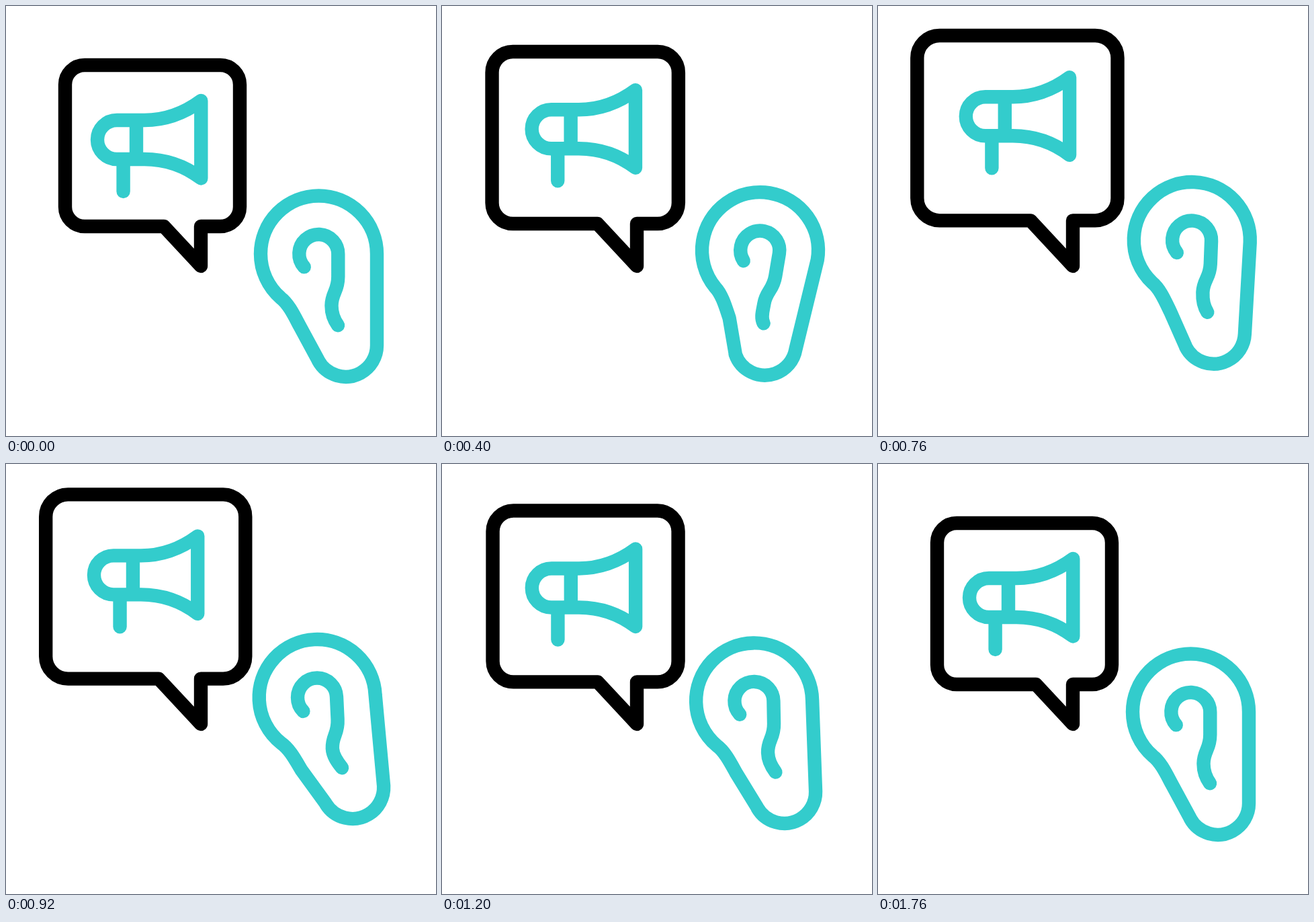
Animation, 640 px wide and 640 px high, one loop 1880 ms. Source, as an HTML page with a canvas:

```html
<!DOCTYPE html>
<html lang="en">
<head>
<meta charset="utf-8">
<title>Listening ear</title>
<style>
html, body { margin: 0; width: 100%; height: 100%; overflow: hidden; background: #fff; }
canvas { display: block; width: 100vw; height: 100vh; }
</style>
</head>
<body>
<canvas id="stage" width="640" height="640"></canvas>
<script>
const ctx = document.getElementById('stage').getContext('2d');
const LOOP = 1880, STEP = 40;
const BLACK = '#000', TEAL = '#33cccc';
const rad = deg => deg * Math.PI / 180;

// Each track is a list of [ms, value] keys joined by a sine ease.
const GROW = [[100, 0], [737, 1], [850, 1], [1485, 0]];
const LIFT = [[148, 0], [860, -21.5], [990, -21.5], [1618, 0]];
const TILT = [[60, 0], [455, 10], [1010, -3.6], [1310, 0]];
const SWING = [[60, 0], [530, -12], [1005, 7.5], [1490, -7], [1760, 0]];

function at(keys, t) {
  if (t <= keys[0][0]) return keys[0][1];
  for (let i = 1; i < keys.length; i++) {
    const [t0, v0] = keys[i - 1], [t1, v1] = keys[i];
    if (t < t1) {
      const u = (t - t0) / (t1 - t0);
      return v0 + (v1 - v0) * (1 - Math.cos(Math.PI * u)) / 2;
    }
  }
  return keys[keys.length - 1][1];
}

function stroke(color, trace) {
  ctx.beginPath();
  trace();
  ctx.strokeStyle = color;
  ctx.stroke();
}

// Grows from the tip of its tail while the line keeps its weight.
function drawBubble(grow) {
  const k = 1 + 0.147 * grow, r = 29 * k;
  const x = v => 290 + (v - 290) * k;
  const y = v => 387 + (v - 387) * k;
  const left = x(88), right = x(348), top = y(88), bottom = y(328);
  stroke(BLACK, () => {
    ctx.moveTo(290, 387);
    ctx.lineTo(290, bottom);
    ctx.arcTo(right, bottom, right, top, r);
    ctx.arcTo(right, top, left, top, r);
    ctx.arcTo(left, top, left, bottom, r);
    ctx.arcTo(left, bottom, right, bottom, r);
    ctx.lineTo(x(235), bottom);
    ctx.closePath();
  });
}

function drawMegaphone(grow) {
  ctx.save();
  ctx.translate(-5.2 * grow, -34.7 * grow);
  stroke(TEAL, () => {
    ctx.moveTo(290.3, 141);
    ctx.bezierCurveTo(266, 159, 237, 170, 206, 170);
    ctx.lineTo(165, 170);
    ctx.arc(165, 199, 29, rad(270), rad(90), true);
    ctx.lineTo(206, 228);
    ctx.bezierCurveTo(237, 228, 266, 238, 290.3, 256.5);
    ctx.closePath();
    ctx.moveTo(194, 170);
    ctx.lineTo(194, 228);
    ctx.moveTo(174.6, 228);
    ctx.lineTo(174.6, 276);
  });
  ctx.restore();
}

// The lobe sways sideways on top of the tilt of the whole ear.
function drawEar(lift, tilt, swing) {
  ctx.save();
  ctx.translate(465.5, 417 + lift);
  ctx.rotate(rad(tilt));
  ctx.translate(-465.5, -417);
  stroke(TEAL, () => {
    ctx.moveTo(552 + swing, 505);
    ctx.lineTo(552, 369);
    ctx.arc(465.5, 369, 86.5, 0, rad(131), true);
    ctx.bezierCurveTo(420.6, 443.2, 429, 461, 437, 476);
    ctx.lineTo(464.8 + swing, 527.4);
    ctx.arc(505.5 + swing, 505.3, 46.5, rad(151.5), 0, true);
    ctx.closePath();
  });
  const tip = swing * 0.55;
  stroke(TEAL, () => {
    ctx.arc(465.3, 369, 29, rad(138), 0);
    ctx.lineTo(494.3, 403);
    ctx.bezierCurveTo(494.3, 425, 484.5, 427, 484.5, 446);
    ctx.bezierCurveTo(484.5, 457, 488 + tip, 467, 494 + tip, 475.3);
  });
  ctx.restore();
}

function draw(t) {
  ctx.fillStyle = '#fff';
  ctx.fillRect(0, 0, 640, 640);
  ctx.lineWidth = 20.4;
  ctx.lineCap = ctx.lineJoin = 'round';
  const grow = at(GROW, t);
  drawBubble(grow);
  drawMegaphone(grow);
  drawEar(at(LIFT, t), at(TILT, t), at(SWING, t));
}

const start = performance.now();
function frame() {
  const t = (performance.now() - start) % LOOP;
  draw(Math.floor(t / STEP) * STEP);
  requestAnimationFrame(frame);
}
frame();
</script>
</body>
</html>
```
